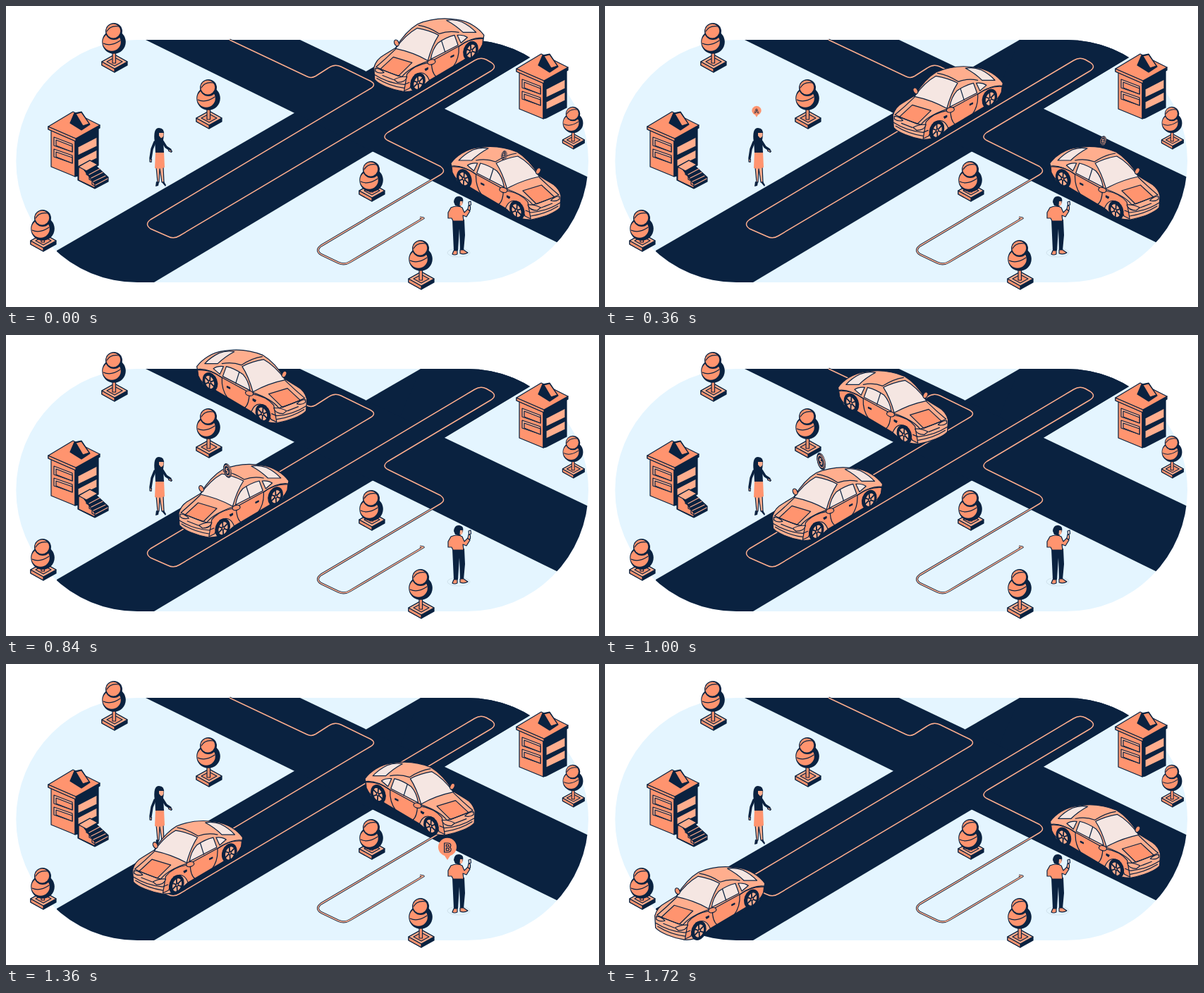
Recreate the animation shown at these times as an HTML page. Size 841 px wide and 427 px high, loop 1.92 s.

```html
<!DOCTYPE html>
<html lang="en">
<head>
<meta charset="utf-8">
<title>Ride sharing</title>
<style>
  html, body { margin: 0; width: 100%; height: 100%; overflow: hidden; background: #fff; }
  svg { display: block; width: 841px; height: 427px; }
  .n { fill: #0a2240; }
  .o { fill: #ff946f; }
  .p { fill: #ffae8e; }
  .w { fill: #f5e6e2; }
  .line { stroke: #0a2240; stroke-width: 1.2; stroke-linejoin: round; stroke-linecap: round; }
  .none { fill: none; }
  text { font: bold 18px "Open Sans", Arial, sans-serif; text-anchor: middle; }
</style>
</head>
<body>
<svg viewBox="0 0 841 427">
  <defs>
    <clipPath id="pill"><rect x="14.3" y="48" width="811.7" height="344" rx="172"/></clipPath>

    <path id="route" class="none" stroke-linejoin="round" d="M317 48 L427 100 Q433 103 439 99.500 L457 88 Q466 81.500 475 86 L517 106.500
      Q526 111.500 517 117 L205 303 Q196 309.500 205 316 L230 327 Q238 331 246 326 L665 77 Q673 72 681 76 L688 80
      Q697 86 688 92 L542 179 Q532 186 542 191 L616 227.500 Q625 234 616 239.500 L447 340 Q438 346.500 447 352.500
      L471 364 Q480 368 488 363 L592 301 L587 300"/>

    <g id="pad" class="line">
      <path class="n" d="M-18 0 L0 -10 18 0 V5 L0 15 -18 5Z"/>
      <path class="o" d="M-18 0 L0 10 V15 L-18 5Z"/>
      <path class="p" d="M-18 0 L0 -10 18 0 0 10Z"/>
      <path class="o" d="M-11 0 L0 -6 11 0 0 6Z"/>
    </g>
    <g id="crown">
      <circle class="n" cy="15" r="16.8"/>
      <circle class="o" cx="-3" cy="15" r="12.8"/>
      <path class="none line" d="M-15 17 Q-4 22 9 13"/>
      <circle class="n" r="12"/>
      <circle class="o" cx="-.8" cy="-.5" r="10"/>
      <path class="none line" d="M-10 0 Q-5 -9 7 -7"/>
    </g>

    <g id="house" class="line">
      <path class="o" d="M64 174 V228 L98 242 V188Z"/>
      <path class="n" d="M98 188 V242 L102 241 131 226 V172Z"/>
      <path class="p" d="M68 186 L94 196 V207 L68 198Z M68 203 L94 212 V223 L68 214Z"/>
      <path class="o" d="M71 190 L94 199 V207 L71 198Z M71 207 L94 215 V223 L71 214Z"/>
      <path class="p" d="M102 200 L129 186 V199 L102 212Z M102 218 L129 204 V216 L102 229Z"/>
      <path class="n" d="M60 171 L99 188 133 169 V173 L99 192 60 175Z"/>
      <path class="o" d="M60 171 L99 188 V192 L60 175Z"/>
      <path class="o" d="M60 171 L95 150 133 169 99 188Z"/>
      <path class="n" d="M91 166 L97 152 107 150 119 168 107 176Z"/>
      <path class="o" d="M99 153 L107 151 118 167 109 170Z"/>
    </g>

    <g id="car" class="line">
      <path class="n" d="M3 86 L42 104 Q56 104 76 92 L127 63 148 50 152 36Z"/>
      <path class="p" d="M1 70 Q4 58 15 52 L31 42 C40 27 52 14 62 8 Q88 -3 117 2 C133 4 147 14 154 24
        L152 36 C150 42 146 50 141 54 L126 58 77 89 68 97 Q55 105 42 104 C25 101 8 94 2 87Z"/>
      <path class="o" d="M47 79 C54 70 65 65 77 63 L120 39 Q139 26 153 28 L152 37 Q147 49 139 50
        L126 59 78 88 Q72 72 58 80 L51 99 43 103Z"/>
      <path class="o" d="M10 72 L28 55 54 63 35 82Z"/>
      <path class="none" d="M31 44 Q18 57 4 69 Q23 78 40 83 Q50 70 76 61"/>
      <path class="w" d="M31 43 Q45 23 61 14 Q78 17 91 24 Q82 38 76 60 Q55 48 31 43Z"/>
      <path class="w" d="M80 58 Q82 44 90 35 Q101 27 113 24 L118 38Z M117 24 Q125 23 131 27 L122 35Z"/>
      <path class="w" d="M102 3 Q113 1 123 5 Q135 11 143 20 L125 20 Q115 10 102 3Z"/>
      <path class="none" d="M95 32 L100 48 M81 61 Q81 78 88 83 L111 69 Q120 57 119 40 M63 10 Q77 12 92 22
        Q105 17 119 20 M119 40 Q134 28 152 29"/>
      <path class="n" d="M108 54 l4 -2 v1.500 l-4 2Z M72 72 l4 -2 v2 l-3 2Z"/>
      <path class="p" d="M3 71 Q10 71 15 77 Q8 79 3 75Z M29 87 Q38 82 47 83 Q45 91 34 91Z"/>
      <path class="none" d="M2 80 Q20 92 43 94 L50 91 M5 85 Q22 96 43 99 M13 81 L28 87"/>
      <ellipse class="o" cx="32.500" cy="35" rx="3" ry="4.600" transform="rotate(-25 32.500 35)"/>
      <ellipse class="o" cx="81" cy="62" rx="5.500" ry="3.500" transform="rotate(-15 81 62)"/>
      <g id="wheel" transform="translate(62 91) rotate(20)">
        <ellipse class="n" rx="9.500" ry="13.500"/>
        <ellipse class="p" cx=".8" rx="6.500" ry="10"/>
        <path d="M-6 0 H7 M-3 -8 L4 8 M4 -8 L-3 8" stroke-width="1.800"/>
        <ellipse class="o" cx=".8" rx="1.500" ry="2.300"/>
      </g>
      <use href="#wheel" transform="translate(73.500 -45)"/>
    </g>

    <path id="bubble" class="o" d="M-4 11 A13 13 0 1 1 4 11 L0 17Z"/>
    <g id="coinFace">
      <ellipse class="p line" cx="1.500" rx="11" ry="12"/>
      <ellipse class="n" rx="10" ry="11.500"/>
      <ellipse class="none" rx="7.500" ry="9" stroke="#ffae8e" stroke-width="1.400"/>
      <text class="p" y="5" style="font-size:14px">$</text>
    </g>
  </defs>

  <rect x="14.300" y="48" width="811.700" height="344" rx="172" fill="#e4f5ff"/>
  <g clip-path="url(#pill)" class="n">
    <path d="M72 347 L588 48 743 20 V73 L210 392 H72Z"/>
    <path d="M588 48 H785 L743 73 520 207Z"/>
    <path d="M198 48 H417 L826 243 V357 L783 336Z"/>
  </g>
  <use href="#route" stroke="#0a2240" stroke-width="3.200"/>
  <use href="#route" stroke="#ffae8e" stroke-width="1.500"/>

  <g id="trees"></g>
  <use href="#house"/>
  <use href="#house" x="664" y="-82"/>
  <g class="line">
    <path class="n" d="M102 228 L119 219 145 243 V249 L126 259 102 247Z"/>
    <path class="o" d="M103 229 L108 229 126 253 V258 L103 247Z"/>
    <path class="p" d="M103 228 L119 219 130 225 114 234Z"/>
    <path class="none" d="M114 234 v5 l4 2 v5 l4 2 v5 l4 2"/>
    <path class="none" style="stroke:#ffae8e" d="M118 239 l15 -8 M121 244 l16 -8 M124 249 l17 -8 M127 254 l17 -9"/>
  </g>

  <g id="woman">
    <path class="p line" stroke-width=".7" d="M213 228 L215 250 217 250 218 230 221 250 224 250 223 228Z"/>
    <path class="n" d="M213 249 l4 1 -1 5 -4 1Z M221 250 l3 -1 3 5 -1 2Z"/>
    <path class="o" d="M212 206 H224 L225 229 Q218 232 211 230Z"/>
    <path class="n" d="M211 190 Q218 186 223 190 L224 208 H212Z"/>
    <path class="none line" style="stroke-width:3.500" d="M211 193 L207 203 205 216 M222 192 L227 200 233 204"/>
    <path class="p line" d="M204 217 l2.500 .5 -.5 4 -2 -.5Z M231 203 l4.500 3 -1 1.500 -4 -2Z"/>
    <path class="n" d="M211 194 Q208 173 217 173 Q225 173 224 183 L223 190 215 196Z"/>
    <path class="p" d="M217 180 h6.500 v4 q-2 4 -4 3 l-2.500 -3Z"/>
  </g>

  <g id="man">
    <ellipse cx="642" cy="350" rx="16" ry="6" fill="none" stroke="#cadce6" stroke-width=".8"/>
    <path class="n" d="M633 303 H650 L651 325 649 347 H644 L643 316 641 347 H635Z"/>
    <path class="o line" d="M635 347 h5 v5 q-4 2 -7 0Z M644 346 h5 l6 4 q-5 3 -11 1Z"/>
    <path class="o line" d="M631 286 Q640 282 647 286 L650 293 655 288 658 291 653 299 648 297 649 305 H634 L632 301 627 301 V293Z"/>
    <path class="p line" d="M655 288 l1 -5 2.500 1 0 5 -2 1Z"/>
    <path class="w line" d="M656 278 l3 -1 .5 5 -3 1Z"/>
    <path class="n" d="M635 278 Q636 269 643 270 Q650 271 648 279 L644 285 637 283Z"/>
    <path class="p" d="M644 277 h3.500 v4 q-1 3 -4 2Z"/>
  </g>

  <use id="carA" href="#car"/>
  <use id="carB" href="#car"/>
  <use id="coinA" href="#coinFace"/>
  <use id="coinB" href="#coinFace"/>
  <g id="pinA"><use href="#bubble"/><text class="o line" y="6">A</text></g>
  <g id="pinB"><use href="#bubble"/><text class="o line" y="6">B</text></g>
</svg>

<script>
const LOOP = 1920, MOVE_END = 1720;
const el = id => document.getElementById(id);
const place = (id, value) => el(id).setAttribute('transform', value);

// x, y of the top ball, distance to the pad, scale
const trees = [
  [153, 36, 43, 1], [287, 116, 43, 1], [518, 232, 30, 1],
  [52, 301, 32, 1], [588, 344, 43, 1], [804, 153, 43, .86]
];
el('trees').innerHTML = trees.map(([x, y, drop, scale]) => `
  <g transform="translate(${x} ${y}) scale(${scale})">
    <use href="#pad" x="1" y="${drop}"/>
    <rect class="o line" x="-2" y="20" width="4.5" height="${drop - 18}"/>
    <use href="#crown"/>
  </g>`).join('');

function ease(t, from, to) {
  const u = Math.min(1, Math.max(0, (t - from) / (to - from)));
  return u * u * (3 - 2 * u);
}

// Grow, hold, shrink
const pop = (t, start, hold, shrink) =>
  ease(t, start, start + 160) * (1 - ease(t, start + hold, start + hold + shrink));

function drawCoin(id, t, start, x, y, tilt) {
  const scale = pop(t, start, 400, 100);
  const rise = 21 * ease(t, start + 80, start + 240);
  const width = .57 + .12 * Math.cos((t - start) / 70);
  place(id, `translate(${x} ${y + 13 - rise}) rotate(${tilt}) scale(${scale * width} ${scale})`);
}

function draw(now) {
  const t = now % LOOP, moving = Math.min(t, MOVE_END);

  const a = -7 + 292 * ease(t, -100, 940) + 170 * ease(moving, 1094, 1775);
  const ax = 523 - a, ay = 17 + a * .598;
  place('carA', `translate(${ax - 1.5} ${ay}) scale(1.02 1)`);
  drawCoin('coinA', t, 720, ax + 68, ay, -15);

  const b = t < 640
    ? .00081 * Math.max(0, t - 375) ** 2
    : -392 + 398 * ease(moving, 640, 1800);
  const bx = 788 + b, by = 199 + b * .495;
  place('carB', `translate(${bx} ${by}) scale(-1.02 1)`);
  drawCoin('coinB', t, -85, bx - 82, by, 12);

  place('pinA', `translate(215 149) scale(${pop(t, 280, 320, 110)})`);
  place('pinB', `translate(626 261) scale(${pop(t, 1160, 320, 110)})`);
  requestAnimationFrame(draw);
}
requestAnimationFrame(draw);
</script>
</body>
</html>
```
